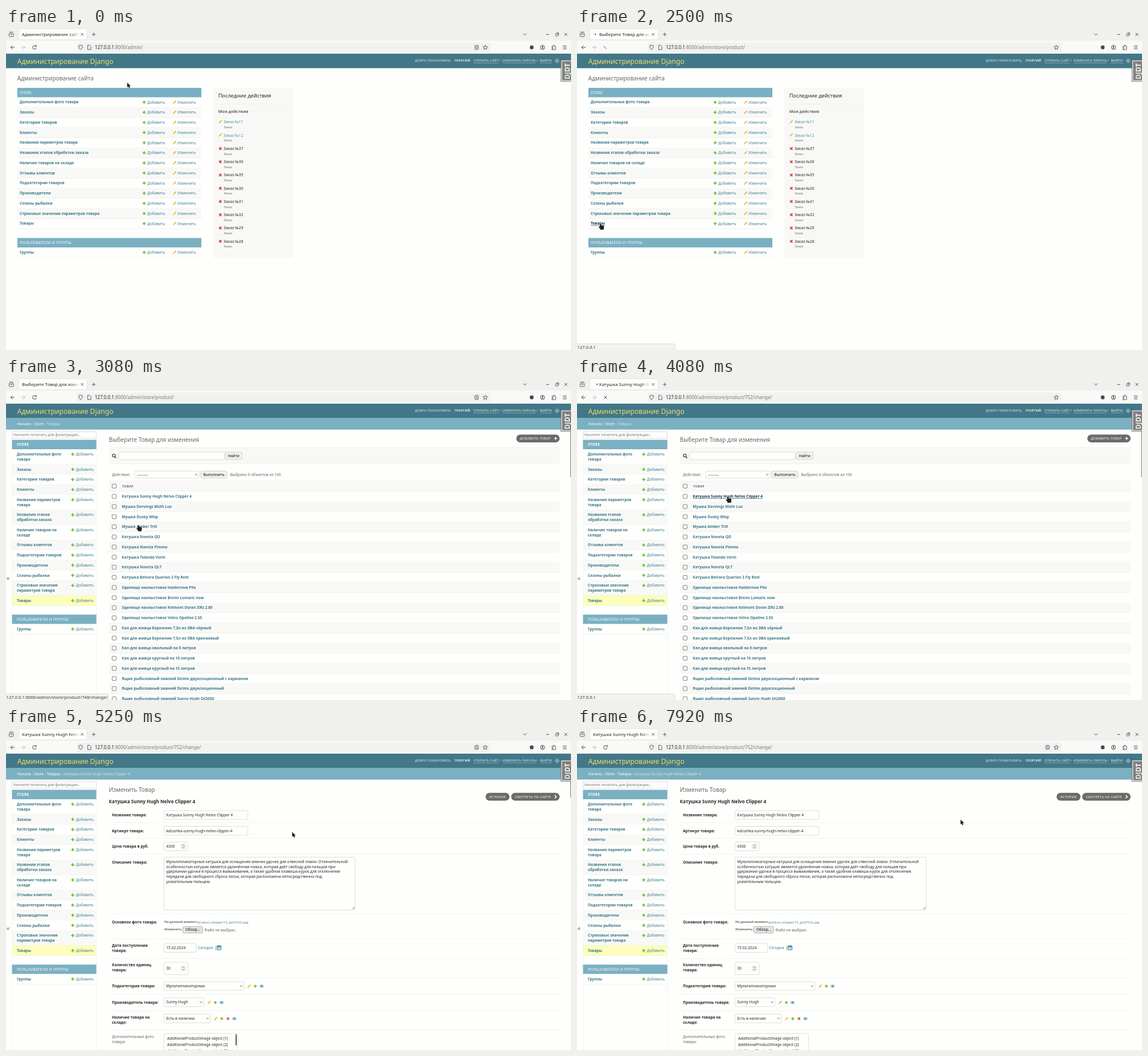
Animation of 992x565 px, one loop 8000 ms. Source, as an HTML page with a canvas:

```html
<!DOCTYPE html>
<html lang="ru">
<head>
<meta charset="utf-8">
<title>Администрирование Django</title>
<style>
html, body { margin: 0; width: 100%; height: 100%; overflow: hidden; background: #fefffc; }
canvas { display: block; width: 992px; height: 565px; }
</style>
</head>
<body>
<canvas id="stage"></canvas>
<script>
const W = 992, H = 565, LOOP = 8000;
const canvas = document.getElementById('stage');
const ratio = window.devicePixelRatio || 1;
canvas.width = W * ratio;
canvas.height = H * ratio;
const c = canvas.getContext('2d');

const PAGE = '#fefffc', SHADE = '#f8f9f6', LINE = '#e9ebe8', TEAL = '#427888', BAR = '#7ab0c1';
const LINK = '#437f96', STRONG = '#3d768b', HOVER = '#123c56', INK = '#272727', GREY = '#666', ICON = '#4a4a4c';

const MODELS = ['Дополнительные фото|товара', 'Заказы', 'Категории товаров', 'Клиенты',
  'Названия параметров|товара', 'Названия этапов|обработки заказа', 'Наличие товаров на|складе',
  'Отзывы клиентов', 'Подкатегории товаров', 'Производители', 'Сезоны рыбалки',
  'Строковые значения|параметров товара', 'Товары'];
const ITEM = 'Катушка Sunny Hugh Nelvo Clipper 4';
const PRODUCTS = [ITEM, 'Мушка Dorvings Moth Lux', 'Мушка Dusky Wisp', 'Мушка Amber Trill',
  'Катушка Noveta QO', 'Катушка Noveta Pimma', 'Катушка Tolando Verin', 'Катушка Noveta QLT',
  'Катушка Belvora Quarlon 2 Fly Reel', 'Удилище нахлыстовое Haldernow Plix',
  'Удилище нахлыстовое Brenn Lomaric now', 'Удилище нахлыстовое Kelmont Doran IIRz 2.80',
  'Удилище нахлыстовое Velno Opaline 2.55', 'Кан для живца Бережник 7,5л из ЭВА чёрный',
  'Кан для живца Бережник 7,5л из ЭВА оранжевый', 'Кан для живца овальный на 6 литров',
  'Кан для живца круглый на 10 литров', 'Кан для живца круглый на 15 литров',
  'Ящик рыболовный зимний Delmo двухсекционный с карманом',
  'Ящик рыболовный зимний Delmo двухсекционный', 'Ящик рыболовный зимний Sunny Hugh SH2050'];
const ABOUT = ['Мультипликаторные катушки для оснащения зимних удочек для отвесной ловли. Отличительной',
  'особенностью катушек является удлинённая ножка, которая даёт свободу для пальцев при',
  'удержании удочки в процессе вываживания, а также удобная клавиша-курок для отключения',
  'передачи для свободного сброса лески, которая расположена непосредственно под',
  'указательным пальцем.'];

// Pointer stops: tick (1/12 s), x, y
const PATH = [[10, 212.8, 96], [13, 184, 146], [17, 101, 299.5], [20, 45, 338], [22, 41.5, 343.5],
  [31, 41.5, 343.5], [34, 130, 310], [37, 232.5, 258.5], [40, 238, 250], [44, 265, 208.5], [57, 265, 208.5],
  [60, 330, 203], [64, 560, 176], [67, 667, 152], [70, 681, 160.5], [76, 681, 160.5], [78, 673.5, 161]];

function pointer(n) {
  let a = PATH[0];
  for (const b of PATH) {
    if (n <= b[0]) {
      const k = b === a ? 0 : (n - a[0]) / (b[0] - a[0]);
      return [a[1] + (b[1] - a[1]) * k, a[2] + (b[2] - a[2]) * k];
    }
    a = b;
  }
  return [a[1], a[2]];
}

function rect(x, y, w, h, fill) {
  c.fillStyle = fill;
  c.fillRect(x, y, w, h);
}

function box(x, y, w, h, r, fill, stroke, lw = 0.6) {
  c.beginPath();
  c.roundRect(x, y, w, h, r);
  if (fill) { c.fillStyle = fill; c.fill(); }
  if (stroke) { c.strokeStyle = stroke; c.lineWidth = lw; c.stroke(); }
}

// Text set by its optical middle; returns the width
function text(s, x, y, size = 6.6, color = INK, weight = 400, gap = 0) {
  c.font = `${weight} ${size}px "Noto Sans", "Open Sans", sans-serif`;
  c.letterSpacing = gap + 'px';
  c.fillStyle = color;
  c.fillText(s, x, y + size * 0.35);
  return c.measureText(s).width;
}
const bold = (s, x, y, size = 6.55, color = INK) => text(s, x, y, size, color, 700);
const caps = (s, x, y, size, color, weight) => text(s, x, y, size, color, weight, 0.26);

function stroke(points, color = ICON, lw = 1) {
  c.beginPath();
  for (let i = 0; i < points.length; i += 2) c.lineTo(points[i], points[i + 1]);
  c.strokeStyle = color;
  c.lineWidth = lw;
  c.stroke();
}

function ring(x, y, r, color = ICON, lw = 0.9, from = 0, to = Math.PI * 2) {
  c.beginPath();
  c.arc(x, y, r, from, to);
  c.strokeStyle = color;
  c.lineWidth = lw;
  c.stroke();
}

function dot(x, y, r, color) {
  c.beginPath();
  c.arc(x, y, r, 0, Math.PI * 2);
  c.fillStyle = color;
  c.fill();
}

function cross(x, y, r, color, lw) {
  stroke([x - r, y - r, x + r, y + r], color, lw);
  stroke([x - r, y + r, x + r, y - r], color, lw);
}

function plus(x, y, r = 2.8, color = '#70c02f', lw = 1.8) {
  stroke([x - r, y, x + r, y], color, lw);
  stroke([x, y - r, x, y + r], color, lw);
}

function pencil(x, y) {
  stroke([x - 1.7, y + 1.7, x + 2.4, y - 2.4], '#e9b92a', 2);
  stroke([x - 2.8, y + 2.8, x - 1.7, y + 1.7], '#c9a23a', 1);
}

function eye(x, y) {
  c.beginPath();
  c.ellipse(x, y, 3.4, 2.1, 0, 0, Math.PI * 2);
  c.strokeStyle = '#4a9cc4';
  c.lineWidth = 0.9;
  c.stroke();
  dot(x, y, 1.4, '#2b80b0');
}

const chevron = (x, y, r, dir, color = ICON, lw = 1) =>
  stroke([x - r, y - r * dir / 2, x, y + r * dir / 2, x + r, y - r * dir / 2], color, lw);
const hline = (x, y, w, color = LINE) => rect(x, y - 0.3, w, 0.6, color);

function field(x, y, w, h, value) {
  box(x, y, w, h, 2, PAGE, '#c6c8c6');
  if (value) text(value, x + 4, y + h / 2, 6.65);
}

function select(x, y, w, h, value) {
  field(x, y, w, h, value);
  chevron(x + w - 5, y + h / 2, 1.8, 1, '#333', 0.9);
}

function number(y, h, value) {
  field(277.3, y, 42.5, h, value);
  const m = y + h / 2;
  box(307, m - 4.2, 9, 8.4, 2, '#ececea', '#d2d2d0', 0.4);
  chevron(311.5, m - 2, 1.5, -1, '#555', 0.8);
  chevron(311.5, m + 2, 1.5, 1, '#555', 0.8);
}

function button(x, y, w, h, label, fill = '#f1f2ef', edge = '#b9bbb9') {
  box(x, y, w, h, 2, fill, edge);
  c.textAlign = 'center';
  text(label, x + w / 2, y + h / 2, 6.7, '#111');
  c.textAlign = 'left';
}

function drawTab(s) {
  rect(0, 0, W, 22.5, '#f0f1ee');
  box(22.5, 1.5, 119.5, 19, 2.5, '#fdfefb', '#d6d7d4', 0.5);
  c.save();
  c.beginPath();
  c.rect(23, 1, 118, 20);
  c.clip();
  if (s.burst) {
    c.globalAlpha = s.burst.alpha;
    dot(33, 11, s.burst.r, '#7fc4e0');
    c.globalAlpha = 1;
  }
  if (s.loading) dot(33 + 4 * Math.sin(s.n * 0.95), 11, 1.3, '#3a6f8a');
  text(s.title, s.loading ? 39 : 28, 11.2, 7.9, '#222');
  const fade = c.createLinearGradient(112, 0, 129, 0);
  fade.addColorStop(0, '#fdfefb00');
  fade.addColorStop(1, '#fdfefb');
  rect(112, 3, 30, 16, fade);
  c.restore();
  cross(133.7, 11.2, 2.2, ICON, 0.9);

  box(5.5, 9, 7.5, 6, 1.2, null, ICON, 0.9);
  stroke([6, 7, 12.5, 7], ICON, 0.8);
  stroke([7.5, 11.5, 11, 11.5], ICON, 1);
  plus(154, 11.3, 3.2, ICON, 0.9);
  chevron(911, 11, 3, 1);
  stroke([948.5, 11.3, 953.5, 11.3], ICON, 1);
  box(965, 10, 4, 4, 0.5, null, ICON, 0.9);
  stroke([966.5, 8.5, 970.3, 8.5, 970.3, 12.5], ICON, 0.9);
  cross(983, 11.3, 2.4, ICON, 1);
}

function drawToolbar(s) {
  rect(0, 22.5, W, 22.5, '#f9faf7');
  box(124.5, 25.5, 726, 17, 2.5, '#f1f2ef');
  const dim = '#b9bab8';
  stroke([11.5, 30.7, 8, 34, 11.5, 37.3], ICON, 1);
  stroke([8, 34, 15, 34], ICON, 1);
  stroke([30, 30.7, 33.5, 34, 30, 37.3], dim, 1);
  stroke([26.5, 34, 33.5, 34], dim, 1);
  if (s.stop === 'turn') stroke([47, 31.5, 51.5, 36.5], ICON, 1);
  else if (s.stop) cross(50, 34, 2.6, s.stop, 1);
  else {
    ring(50, 34, 3.3, ICON, 1, 0.2, 5.4);
    stroke([50.8, 32.4, 53.4, 32.4, 53.4, 29.8], ICON, 1);
  }
  c.beginPath();
  c.moveTo(131, 30);
  c.lineTo(134.3, 31.2);
  c.quadraticCurveTo(134.5, 36, 131, 38);
  c.quadraticCurveTo(127.5, 36, 127.7, 31.2);
  c.closePath();
  c.strokeStyle = ICON;
  c.lineWidth = 0.9;
  c.stroke();
  stroke([143.5, 30.2, 146.5, 30.2, 149, 32.7, 149, 37.8, 143.5, 37.8, 143.5, 30.2], ICON, 0.9);
  const w = text('127.0.0.1', 156, 34, 8, '#222');
  text(':8000' + s.url, 156 + w, 34, 8, '#777');

  if (s.reader) {
    box(823.3, 30.5, 6, 7, 1, null, ICON, 0.9);
    for (const y of [32.5, 34, 35.5]) stroke([824.7, y, 828, y], ICON, 0.6);
  }
  const star = [];
  for (let i = 0; i <= 10; i++) {
    const r = i % 2 ? 1.9 : 4.2, a = i * Math.PI / 5 - Math.PI / 2;
    star.push(841.5 + r * Math.cos(a), 34.2 + r * Math.sin(a));
  }
  stroke(star, ICON, 0.9);
  dot(923, 34, 3.4, ICON);
  ring(942, 34, 3.8);
  dot(942, 32.9, 1.3, ICON);
  ring(942, 37.5, 2.4, ICON, 1, Math.PI * 1.1, Math.PI * 1.9);
  stroke([958.5, 32, 961, 32, 961, 30.3, 963, 30.3, 963, 32, 965, 32, 965, 38, 958.5, 38,
    958.5, 36.2, 960.5, 36.2, 960.5, 34, 958.5, 34, 958.5, 32], ICON, 0.9);
  for (const y of [31.3, 34, 36.7]) stroke([977.7, y, 984.3, y], ICON, 0.9);
}

function drawHeader() {
  rect(0, 45, W, 25.5, TEAL);
  text('Администрирование Django', 19.8, 58.3, 12.1, '#f0dc68', 300);
  const pale = '#e8f1f1';
  caps('ДОБРО ПОЖАЛОВАТЬ,', 718, 57.3, 5.5, pale);
  caps('ГЕОРГИЙ.', 787.5, 57.3, 5.4, pale, 700);
  const links = [['ОТКРЫТЬ САЙТ', 821], ['ИЗМЕНИТЬ ПАРОЛЬ', 872], ['ВЫЙТИ', 937.5]];
  links.forEach(([label, x], i) => {
    const w = caps(label, x, 57.3, 5.5, pale);
    hline(x, 61.2, w, '#a9c6cc');
    if (i < 2) caps('/', x + w + 1.2, 57.3, 5.5, pale);
  });
  ring(967.7, 57.6, 1.9, pale, 0.9);
  for (let i = 0; i < 8; i++) {
    const x = Math.cos(i * Math.PI / 4), y = Math.sin(i * Math.PI / 4);
    stroke([967.7 + 3 * x, 57.6 + 3 * y, 967.7 + 4.2 * x, 57.6 + 4.2 * y], pale, 0.8);
  }
}

function drawHandle() {
  c.save();
  c.globalAlpha = 0.75;
  rect(973.8, 55.8, 18.2, 38.4, '#222');
  rect(974.4, 56.4, 17.6, 37.2, '#fff');
  rect(976.5, 58.5, 15.5, 33, '#666');
  c.globalAlpha = 0.95;
  c.translate(985.6, 90);
  c.rotate(-Math.PI / 2);
  const w = bold('DJ', 0, 0, 11.9, '#e0f5dc');
  bold('DT', w, 0, 11.9, '#fff');
  c.restore();
}

function addLink(x, y) {
  plus(x, y);
  text('Добавить', x + 5.5, y, 6.6, LINK);
}

function moduleHead(x, y, w, pad, label, weight) {
  rect(x, y, w, 16.5, BAR);
  caps(label, x + pad, y + 8.3, 6.4, '#fff', weight);
}

function indexRow(label, y, shade, state) {
  if (shade) rect(20, y, 323, 17.75, SHADE);
  hline(20, y + 17.75, 323);
  const m = y + 8.7;
  const w = bold(label, 24, m, 6.5, state ? HOVER : STRONG);
  if (state === 'focus') hline(24, m + 3.6, w, HOVER);
  addLink(242.6, m);
  pencil(296, m);
  text('Изменить', 301, m, 6.6, LINK);
}

function drawIndex(s) {
  text('Администрирование сайта', 19.8, 88, 10.1, GREY, 300);
  moduleHead(20, 105, 323, 4, 'STORE');
  MODELS.forEach((m, i) => {
    const state = i === 12 && s.n >= 20 ? (s.n >= 23 ? 'focus' : 'hover') : '';
    indexRow(m.replace('|', ' '), 121.5 + i * 17.75, i % 2, state);
  });
  moduleHead(20, 368.5, 323, 4, 'ПОЛЬЗОВАТЕЛИ И ГРУППЫ');
  indexRow('Группы', 385, false);

  rect(364, 104.5, 140, 299, SHADE);
  text('Последние действия', 372.7, 119, 9.15);
  hline(364, 133.5, 140);
  bold('Мои действия', 372.7, 147, 7, GREY);
  [11, 12, 37, 36, 35, 30, 31, 32, 29, 28].forEach((id, i) => {
    const y = 165 + i * 23.25;
    if (i < 2) pencil(376.2, y - 0.5);
    else cross(376.3, y, 2.1, '#cf4a44', 1.8);
    text('Заказ №' + id, 382, y, 6.7, i < 2 ? '#4690a0' : INK);
    text('Заказ', 382.3, y + 9.2, 5.3, GREY);
  });
}

function drawSidebar(last) {
  rect(0, 70.5, W, 20, BAR);
  let x = 19.8;
  const trail = ['Начало', 'Store', 'Товары'].concat(last || []);
  trail.forEach((part, i) => {
    const pale = i === trail.length - 1;
    x += text(part, x, 81, 6.65, pale ? '#cfe3e9' : '#fff');
    if (!pale) x += text(' › ', x, 81, 6.65, '#cfe3e9');
  });

  const left = 10.6, width = 148;
  rect(left - 0.6, 90.5, 0.6, H - 90.5, LINE);
  rect(left + width, 90.5, 0.6, H - 90.5, LINE);
  text('«', 0.8, 351.5, 11, GREY);
  box(left + 0.2, 94.3, width - 0.4, 11.5, 0.5, PAGE, '#c6c8c6');
  text('Начните печатать для фильтрации...', 13, 100, 6.55, '#777');
  moduleHead(left, 108.5, width, 8.4, 'STORE', 700);
  let y = 125;
  MODELS.concat('', 'Группы').forEach((m, i) => {
    if (!m) {
      moduleHead(left, 415.2, width, 8.4, 'ПОЛЬЗОВАТЕЛИ И ГРУППЫ');
      y = 431.7;
      return;
    }
    const lines = m.split('|'), h = lines.length > 1 ? 26.5 : 17.75;
    rect(left, y, width, h, i === 12 ? '#fcfeba' : i % 2 ? SHADE : PAGE);
    hline(left, y + h, width);
    lines.forEach((t, k) => bold(t, 19, y + 8.8 + k * 8.7, 6.5, STRONG));
    addLink(117.2, y + 8.8);
    y += h;
  });
}

function pill(x, y, w, label) {
  box(x, y, w, 13.8, 6.9, '#6b6b69');
  caps(label, x + 6.2, y + 6.9, 5.75, '#fff');
}

const check = y => box(186.4, y - 3.5, 7, 7, 1, PAGE, '#5c5d60', 0.8);

function drawList(s) {
  drawSidebar();
  text('Выберите Товар для изменения', 180.6, 108, 10.1, GREY, 300);
  pill(896, 99.2, 76, 'ДОБАВИТЬ ТОВАР');
  plus(965, 106.1, 2.5, '#fff', 1.5);
  rect(180.6, 122, 791.4, 28.5, SHADE);
  hline(180.6, 122, 791.4);
  hline(180.6, 150.5, 791.4);
  ring(189.3, 136, 2.5, '#333', 1.2);
  stroke([191, 138, 193.5, 140.5], '#333', 1.5);
  field(198, 130, 185, 13);
  button(385, 130, 29.3, 13, 'Найти');
  text('Действие:', 186, 169.5, 6.6, GREY);
  select(226, 163.3, 113, 12.5, '---------');
  button(342, 163.3, 46, 12.5, 'Выполнить');
  text('Выбрано 0 объектов из 100', 393.5, 169.5, 6.6, GREY);

  rect(180.6, 181, 791.4, 17.9, SHADE);
  hline(180.6, 181, 791.4);
  hline(180.6, 198.9, 791.4);
  check(189.7);
  caps('ТОВАР', 204, 189.7, 5.5, GREY, 700);
  PRODUCTS.forEach((name, i) => {
    const y = 198.9 + i * 17.75, m = y + 8.9;
    if (i % 2) rect(180.6, y, 791.4, 17.75, SHADE);
    hline(180.6, y + 17.75, 791.4);
    check(m);
    const hot = i === 0 && s.row === 0;
    const w = bold(name, 203.3, m, 6.55, hot ? HOVER : STRONG);
    if (hot && s.n >= 46) hline(203.3, m + 3.6, w, HOVER);
  });
}

function tools(x, y, withCross) {
  pencil(x, y);
  plus(x + 10.8, y, 2.6);
  if (withCross) cross(x + 21.8, y, 2, '#cf4a44', 1.7);
  eye(x + (withCross ? 33 : 21.8), y);
}

function drawForm(s) {
  drawSidebar(ITEM);
  text('Изменить Товар', 180.6, 108, 10.1, GREY, 300);
  bold(ITEM, 180.6, 129.5, 8.1);
  pill(842, 113.8, 42, 'ИСТОРИЯ');
  pill(887, 113.8, 85, 'СМОТРЕТЬ НА САЙТЕ');
  stroke([963.5, 117.9, 966.3, 120.7, 963.5, 123.5], '#fff', 1.5);
  for (const y of [166, 193.5, 221, 326, 370, 404.5, 438.7, 467, 496, 530]) hline(180.6, y, 791.4);

  const labels = [[152.8, 'Название товара:'], [180.4, 'Артикул товара:'], [208, 'Цена товара в руб.'],
    [235.5, 'Описание товара:'], [340.5, 'Основное фото товара:'], [381.5, 'Дата поступления|товара:'],
    [416, 'Количество единиц|товара:'], [453, 'Подкатегория товара:'], [481.5, 'Производитель товара:'],
    [507.7, 'Наличие товара на|складе:']];
  for (const [y, label] of labels) label.split('|').forEach((t, k) => bold(t, 186, y + k * 9));
  text('Дополнительные фото', 186, 541.8, 6.6, GREY);
  text('товара:', 186, 550.8, 6.6, GREY);

  field(277.3, 145, 147.5, 15.5, ITEM);
  field(277.3, 172.5, 147.5, 15.5, 'katushka-sunny-hugh-nelvo-clipper-4');
  number(200, 15.5, '4300');
  box(277.3, 226.7, 335.7, 92.7, 2, PAGE, '#c6c8c6');
  ABOUT.forEach((t, i) => text(t, 281.3, 234.6 + i * 8.65, 6.58));
  stroke([607.5, 318, 612, 313.5], '#777', 0.8);
  stroke([610, 318, 612, 316], '#777', 0.8);

  bold('На данный момент:', 278, 340.5, 5.6, GREY);
  text('product_images/13_gmVTiUL.jpg', 336.5, 340.5, 5.75, LINK);
  bold('Изменить:', 278, 353.3, 5.6, GREY);
  button(310.7, 348.2, 34.6, 11.6, 'Обзор...', '#e6e7e4', '#85868a');
  text('Файл не выбран.', 348.3, 354.2, 6.7, GREY);
  field(277.3, 378, 57, 15.5, '15.02.2024');
  text('Сегодня', 337, 385.5, 6.6, LINK);
  text('|', 366.3, 385.5, 6.6);
  box(370.3, 382, 7.4, 7.4, 1, '#b9d6e2', '#4a8aa6', 0.9);
  rect(370.3, 382, 7.4, 2.4, '#4a8aa6');
  number(411, 21.7, '30');
  select(277.3, 445, 140.5, 15.3, 'Мультипликаторные');
  tools(427, 453);
  select(277.3, 473.3, 70, 15.5, 'Sunny Hugh');
  tools(356.7, 481.7);
  select(277.3, 501.8, 81.5, 15.5, 'Есть в наличии');
  tools(368, 510, true);

  box(277.3, 536, 129, 40, 2, PAGE, '#c6c8c6');
  for (let i = 0; i < 3; i++) text(`AdditionalProductImage object (${i + 1})`, 283, 545 + i * 10.6, 6.65);
  c.globalAlpha = Math.max(0, Math.min(1, (70 - s.n) / 4));
  box(403.2, 537.5, 1.8, 19.5, 0.9, '#444');
  c.globalAlpha = 1;
}

function drawStatus(label) {
  const wide = label.length > 40;
  box(-2, 554.2, wide ? 182 : 174, 14, 2, '#f3f4f1', '#c4c5c3', 0.6);
  text(label, 0.6, 560.5, 7.65, '#333');
}

function drawPointer(x, y, hand) {
  c.save();
  c.translate(x, y);
  c.beginPath();
  if (hand) {
    c.roundRect(-1.2, 0, 2.4, 6, 1.1);
    c.roundRect(-1.2, 3, 7, 4.5, 1.4);
    c.roundRect(-3, 4.8, 3, 2.6, 1.2);
    c.roundRect(-1, 5, 6.6, 5.2, 1);
  } else {
    const p = [0, 0, 0, 8, 1.9, 6.4, 3.3, 9.6, 4.8, 9, 3.5, 5.9, 6, 5.7];
    for (let i = 0; i < p.length; i += 2) c.lineTo(p[i], p[i + 1]);
    c.closePath();
  }
  c.strokeStyle = '#d5d6d4';
  c.lineWidth = 1.1;
  c.stroke();
  c.fillStyle = '#1d1d1d';
  c.fill();
  c.restore();
}

function stateAt(n) {
  const page = n < 31 ? 0 : n < 51 ? 1 : 2;
  const [x, y] = pointer(n);
  const hand = (n >= 20 && n < 31) || (n >= 35 && n < 51);
  const row = page === 1 && hand ? Math.floor((y - 198.9) / 17.75) : -1;
  const view = n < 28 ? 0 : n < 48 ? 1 : 2;
  const loading = (n >= 24 && n < 33) || (n >= 47 && n < 52);
  const start = n < 45 ? 32 : 51;
  const age = n - start;
  let status = '';
  if (page === 0 && n >= 21) status = n < 24 ? '127.0.0.1:8000/admin/store/product/' : '127.0.0.1';
  if (row >= 0) {
    status = n >= 48 ? '127.0.0.1'
      : `127.0.0.1:8000/admin/store/product/${row ? 751 - row : 752}/change/`;
  }
  return {
    n, page, x, y, hand, row, loading, status,
    title: ['Администрирование сайта', 'Выберите Товар для изменения', ITEM][view],
    url: ['/admin/', '/admin/store/product/', '/admin/store/product/752/change/'][view],
    reader: !((n >= 28 && n < 32) || (n >= 48 && n < 51)),
    stop: n === 30 ? 'turn' : loading ? ICON : n >= 52 && n < 57 ? '#b5b6b4' : '',
    burst: age > 0 && age < (start === 32 ? 5 : 8)
      ? { r: 2 + age * 2.8, alpha: Math.max(0, 1 - age * 0.13) } : null
  };
}

function draw(n) {
  const s = stateAt(n);
  c.setTransform(ratio, 0, 0, ratio, 0, 0);
  rect(0, 0, W, H, PAGE);
  drawTab(s);
  drawToolbar(s);
  drawHeader();
  [drawIndex, drawList, drawForm][s.page](s);
  if (s.page) {
    c.globalAlpha = Math.max(0, Math.min(1, (95 - n) / 5));
    rect(991, 47, 1, s.page === 1 ? 127 : 75, '#777');
    c.globalAlpha = 1;
  }
  drawHandle();
  if (s.status) drawStatus(s.status);
  drawPointer(s.x, s.y, s.hand);
}

let shown = -1;
function tick(now) {
  const n = Math.floor((now % LOOP + 5) * 0.012) % 96;
  if (n !== shown) draw(shown = n);
  requestAnimationFrame(tick);
}
draw(0);
requestAnimationFrame(tick);
</script>
</body>
</html>
```
